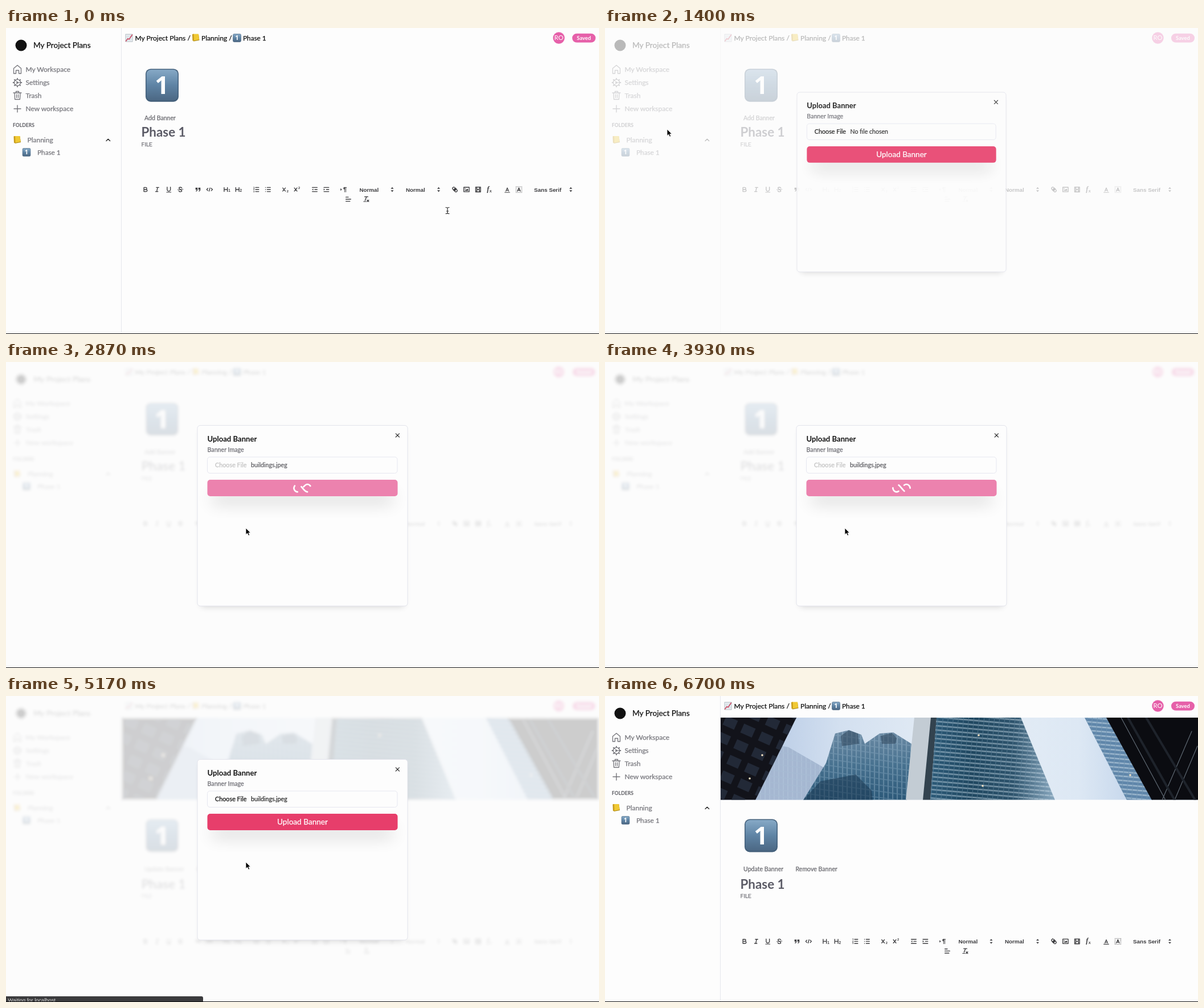
Recreate the animation shown at these times as an HTML page. Size 1041 by 538 pixels, loop 6.73 s.

```html
<!DOCTYPE html>
<html lang="en">
<head>
<meta charset="utf-8">
<title>Upload banner</title>
<style>
html, body { margin: 0; width: 100%; height: 100%; overflow: hidden; background: #fdfdfd; }
svg { display: block; width: 1041px; height: 538px; font-family: Lato, "Open Sans", sans-serif; }
.line { fill: none; stroke-linecap: round; stroke-linejoin: round; }
.ui { font-family: "Liberation Sans", Arial, sans-serif; }
</style>
</head>
<body>
<svg id="stage" viewBox="0 0 1041 538" xmlns="http://www.w3.org/2000/svg"></svg>
<script>
const LOOP = 6730;
const OPEN = 1295, CLOSE = 6225, FADE = 200;
const PICKED = 2080, SEND = 2600, DONE = 4860;
const STATUS = [5000, 5680], FOCUS = 6040;
const PINK = '#e73e6b', GRAY = '#75757b', INK = '#3c3c3f';

// Medium weight is regular with a thin outline
const text = (x, y, s, size, fill = '#111', weight = 400, extra = '') =>
  `<text x="${x}" y="${y}" font-size="${size}" fill="${fill}" ` +
  (weight === 500 ? `stroke="${fill}" stroke-width=".25" ` : `font-weight="${weight}" `) + `${extra}>${s}</text>`;
const rect = (x, y, w, h, fill, extra = '') =>
  `<rect x="${x}" y="${y}" width="${w}" height="${h}" fill="${fill}" ${extra}/>`;
const poly = (points, fill, extra = '') => `<polygon points="${points}" fill="${fill}" ${extra}/>`;
const line = (d, color, width, extra = '') =>
  `<path class="line" d="${d}" stroke="${color}" stroke-width="${width}" ${extra}/>`;
const group = (id, body, extra = '') => `<g id="${id}" ${extra}>${body}</g>`;
const at = (x, y, k, body) => `<g transform="translate(${x} ${y}) scale(${k})">${body}</g>`;

// Keycap tile, centred, 58 units wide
const keycap = (x, y, k) => at(x, y, k,
  rect(-29, -29, 58, 58, '#44607b', 'rx="9"') +
  rect(-27.5, -27.5, 55, 54, 'url(#cap)', 'rx="8"') +
  text(-.5, 15, '1', 43, '#fff', 700, 'text-anchor="middle" font-family="Open Sans, sans-serif"'));

const notebook = (x, y) => at(x, y, 1,
  poly('-5,-6 5,-6 6.5,4.5 -4,6.5', '#a98512') + poly('-5,-6.5 5,-6.5 6,3.5 -4,5.5', '#f0c934') +
  poly('-6,-6 -3.5,-6.5 -3,5.3 -5.5,5.5', '#c79a1a'));

const chart = (x, y) => at(x, y, 1,
  rect(-6, -6.5, 12, 13, '#e9eef2', 'stroke="#9aa5ad" stroke-width=".7"') +
  line('M-6,-2H6M-6,2H6M-2,-6V6M2,-6V6', '#c3cfd7', .5) +
  line('M-5.5,5.5L-2,1L0,2.5L5.5,-5.5', '#c9405a', 1.4));

// Editor toolbar glyphs on an 18 unit grid
const stroke = d => line(d, INK, 1.9);
const fill = d => `<path d="${d}" fill="${INK}"/>`;
const glyphText = (x, y, s, size, extra = '') => text(x, y, s, size, INK, 700, `class="ui" ${extra}`);
const rows = 'M7,4H15M7,9H15M7,14H15';
const letterA = stroke('M5.5,13L9,5L12.5,13M11.6,11H6.4');
const serif = 'font-style="italic" style="font-family:Liberation Serif,serif"';
const GLYPHS = {
  bold: stroke('M5,4H9.5A2.5,2.5 0 0 1 9.5,9H5ZM5,9H10.5A2.5,2.5 0 0 1 10.5,14H5Z'),
  italic: stroke('M7,4H13M5,14H11M8,14L10,4'),
  underline: stroke('M5,3V9A4,4 0 0 0 13,9V3') + fill('M3,15H15V16.4H3Z'),
  strike: stroke('M12.5,5.5C12,4 10.5,3.5 9,3.5C4.5,3.5 4.5,7.5 9,9C13.5,10.5 13.5,14.5 9,14.5C7,14.5 5.5,13.5 5.3,12') +
    line('M2.5,9.5L15.5,8.5', INK, 1.2),
  quote: fill('M3,4.5H8V9C8,12 6.5,14 4,14V12C5.4,12 6,11 6,9.5H3ZM10,4.5H15V9C15,12 13.5,14 11,14V12C12.4,12 13,11 13,9.5H10Z'),
  code: stroke('M5,6L2,9L5,12M13,6L16,9L13,12M10,5L8,13'),
  h1: stroke('M2,4V14M10,4V14M10,9H2') + glyphText(12, 15, '1', 9),
  h2: stroke('M2,4V14M10,4V14M10,9H2') + glyphText(12, 15, '2', 9),
  ordered: stroke(rows) + ['1', '2', '3'].map((n, i) => glyphText(1.5, 6 + i * 5, n, 6)).join(''),
  bullet: stroke(rows + 'M3,4H3.1M3,9H3.1M3,14H3.1'),
  sub: stroke('M2.5,5L9,13M9,5L2.5,13') + glyphText(12, 16, '2', 8),
  sup: stroke('M2.5,5L9,13M9,5L2.5,13') + glyphText(12, 7, '2', 8),
  outdent: stroke('M3,4H15M3,14H15M9,9H15') + fill('M5.5,6.5V11.5L2.5,9Z'),
  indent: stroke('M3,4H15M3,14H15M9,9H15') + fill('M2.5,6.5V11.5L5.5,9Z'),
  direction: fill('M1,6V12L4.5,9ZM11,3A3,3 0 0 0 11,9H12V3Z') + line('M15.5,4H11M11,4V15M14,4V15', INK, 1.3),
  link: stroke('M7,11L11,7M8.9,4.6A3.5,3.5 0 1 1 4.6,8.9C3.2,7.5 2,6.4 4.2,4.2S7.5,3.2 8.9,4.6ZM13.4,9.1A3.5,3.5 0 1 0 9.1,13.4C10.5,14.8 11.6,16 13.8,13.8S14.8,10.5 13.4,9.1Z'),
  image: stroke('M2.5,3.5H15.5V14.5H2.5Z') + fill('M5,12V11L7,9L8,10L11,7L13,9V12ZM5,6H7V8H5Z'),
  video: stroke('M3,3H15V15H3ZM6,3V15M12,3V15M6,9H12') + line('M3,6H6M3,12H6M12,6H15M12,12H15', INK, 1),
  formula: glyphText(2, 13, 'f', 17, serif) + glyphText(8, 16, 'x', 12, serif),
  color: line('M5.5,13L9,5L12.5,13M11.6,11H6.4M3,16H15', INK, 1.6),
  background: line('M2,2H16V16H2Z', INK, 1.4, 'stroke-dasharray=".1 2.7"') + letterA,
  align: stroke('M3,9H15M3,14H13M3,4H9'),
  clean: stroke('M5,3H13M6,12L9.2,4M11,11L15,15M15,11L11,15') + fill('M2,14H9V15.5H2Z'),
  updown: fill('M5.5,10.8H12.5L9,14.8ZM5.5,7.2H12.5L9,3.2Z')
};
const glyph = (name, x, y) => at(x - 6.5, y - 6.5, .72, GLYPHS[name]);
const run = (x, names, y = 284) => names.split(' ').map((n, i) => glyph(n, x + i * 20.4, y)).join('');
const label = (x, s) => text(x, 287.5, s, 9.8, INK, 700, 'class="ui"');

const toolbar = run(245, 'bold italic underline strike') + run(337, 'quote code') + run(388, 'h1 h2') +
  run(439.5, 'ordered bullet') + run(490.5, 'sub sup') + run(542, 'outdent indent') + run(593, 'direction') +
  label(620.5, 'Normal') + run(678, 'updown') + label(702, 'Normal') + run(759.5, 'updown') +
  run(788, 'link image video formula') + run(880, 'color background') +
  label(927, 'Sans Serif') + run(991.5, 'updown') + run(601, 'align', 301) + run(632.5, 'clean', 301);

const gear = () => {
  let d = '';
  for (let i = 0; i < 8; i++) {
    const a = i * Math.PI / 4, c = Math.cos(a), s = Math.sin(a);
    d += `M${20 + 5.6 * c},${96 + 5.6 * s}L${20 + 7.4 * c},${96 + 7.4 * s}`;
  }
  return line(d, GRAY, 1.8) + line('M20,96L16.5,91M20,96H26M20,96L16.5,101', GRAY, 1) +
    `<circle cx="20" cy="96" r="5.6" fill="none" stroke="${GRAY}" stroke-width="1.3"/><circle cx="20" cy="96" r="1.8" fill="${GRAY}"/>`;
};

const sidebar = '<circle cx="26.5" cy="30.5" r="10" fill="#111"/>' +
  text(48, 35.2, 'My Project Plans', 13.7, '#111', 500) +
  line('M13.5,71L20,65.5L26.5,71V80H22.5V74.5H17.5V80H13.5Z', GRAY, 1.3) + gear() +
  line('M13,114H27M15,114L15.6,125.5H24.4L25,114M17.5,113.5V111.5H22.5V113.5M18.5,117V122.5M21.5,117V122.5', GRAY, 1.3) +
  line('M14,142H26M20,136V148', GRAY, 1.4) +
  ['My Workspace', 'Settings', 'Trash', 'New workspace'].map((s, i) => text(34.5, 76.8 + i * 23.1, s, 12, GRAY, 500)).join('') +
  text(12, 173.7, 'FOLDERS', 8.6, '#5c5c62', 700) + notebook(19.5, 196.5) + text(37.5, 201, 'Planning', 12, GRAY, 500) +
  line('M176,198.5L179.3,195.3L182.6,198.5', '#222', 1.3) +
  keycap(36, 218.5, .25) + text(55, 222.6, 'Phase 1', 11.8, GRAY, 500) + rect(202, 0, 1, 538, '#e6e7ec');

const header = chart(216, 17.5) + text(226.5, 21.6, 'My Project Plans /', 12.1, '#111', 500) +
  notebook(333, 17) + text(343, 21.6, 'Planning /', 12, '#111', 500) +
  keycap(405.5, 17.5, .25) + text(416, 21.6, 'Phase 1', 11.8, '#111', 500) +
  '<circle cx="970.5" cy="17.5" r="10.2" fill="#e660a9"/>' +
  text(970.5, 21.4, 'RO', 11.3, '#fff', 400, 'text-anchor="middle"') +
  rect(994, 9.8, 41, 15.8, '#e660a9', 'rx="7.9"') + text(1014.5, 21, 'Saved', 9.4, '#fff', 700, 'text-anchor="middle"');

// Skyline reduced to flat shapes and soft gradients
const shape = (points, base, detail, strength) =>
  poly(points, base) + poly(points, detail, `opacity="${strength}"`);
const skyline = rect(203, 38, 838, 145, 'url(#sky)') +
  shape('300,86 322,90 388,128 352,183 262,183', '#a5b7d1', 'url(#panes)', .25) +
  shape('203,38 336,38 264,183 203,183', '#12131a', 'url(#dark)', 1) +
  shape('348,183 388,118 404,66 428,60 450,68 456,84 482,66 506,64 538,84 530,183', 'url(#steel)', 'url(#panes)', .3) +
  poly('348,183 378,150 440,138 468,166 470,183', '#1d3a52', 'opacity=".55"') +
  poly('414,70 428,60 444,66 446,84 416,88', '#263f55', 'opacity=".5"') +
  poly('484,70 504,65 512,74 510,84 486,84', '#263f55', 'opacity=".5"') +
  poly('543,38 592,38 574,183 528,183', '#c3ccd4') + poly('572,38 582,38 571,183 558,183', '#33434f') +
  shape('582,38 730,38 790,183 571,183', 'url(#glass)', 'url(#floors)', .45) +
  shape('842,38 884,38 962,183 916,183', '#5f86aa', 'url(#floors)', .5) +
  poly('880,38 1041,38 1041,183 960,183', '#0b0c11') +
  line('M906,38L984,183M1030,62L978,183M1040,88L1000,183', '#5f6973', 1.2) +
  line('M918,38L1000,183M950,38L1036,183', '#1e232b', 4) +
  [[276, 104], [254, 145], [663, 158], [656, 69], [922, 139]].map(([x, y]) => `<circle cx="${x}" cy="${y}" r="1.8" fill="#f7e4c5"/>`).join('');

const main = group('banner', skyline, 'clip-path="url(#bannerBox)"') +
  group('tile', keycap(274, 100.7, 1)) +
  group('links', '<text id="addLink" x="243" y="161.8" font-size="10.6" fill="#68686e" stroke="#68686e" stroke-width=".25"/>' +
    group('removeLink', text(334.5, 161.8, 'Remove Banner', 10.6, '#68686e', 500))) +
  group('editor', text(237.5, 191.3, 'Phase 1', 22.4, '#5b5b66', 700) + text(237.5, 208, 'FILE', 10, GRAY, 500) + toolbar);

const infinity = 'M24.3,30C11.4,30 5,43.3 5,50S11.4,70 24.3,70C43.6,70 56.4,30 75.7,30C88.6,30 95,43.3 95,50S88.6,70 75.7,70C56.4,70 43.6,30 24.3,30Z';
const dialog = rect(342, 120, 357, 310, '#000', 'rx="5" opacity=".17" filter="url(#soft)"') +
  rect(336, 111.5, 369, 317.5, '#fdfdfd', 'rx="5" stroke="#e3e4ec"') +
  rect(362, 234, 317, 12, '#000', 'opacity=".22" filter="url(#wide)"') +
  text(353.5, 140, 'Upload Banner', 13.1, '#111', 700) +
  text(353.5, 157.5, 'Banner Image', 10.7, '#6b6b72', 500) +
  rect(353.5, 167, 333.5, 28.5, '#fdfdfd', 'rx="4.5" stroke="#e6e7f0"') +
  group('choose', text(367, 185, 'Choose File', 10.8, '#111', 500)) +
  '<text id="file" x="430" y="185" font-size="10.65" stroke-width=".2"/>' +
  '<rect id="button" x="353.5" y="207" width="334" height="29" rx="5"/>' +
  group('caption', text(520.5, 226.2, 'Upload Banner', 13.6, '#fff', 500, 'text-anchor="middle"')) +
  group('spinner', `<path id="dash" class="line" d="${infinity}" stroke="#fff" stroke-width="8" stroke-dasharray="42.765"/>`,
    'transform="translate(520.5 221.7) scale(.336) translate(-50 -50)"') +
  group('ring', rect(679.5, 121.5, 15.5, 15.5, 'none', `rx="4" stroke="${PINK}" stroke-width="1.6"`)) +
  line('M684.2,125.8L690.4,132M690.4,125.8L684.2,132', '#333', 1.2);

const cursors = group('arrow', '<path d="M0,0V11.5L2.7,9L4.6,13.2L6.6,12.3L4.8,8.3H8.3Z" fill="#000" stroke="#fff" stroke-width=".8"/>') +
  group('hand', '<path d="M-1.3,1Q0,-1 1.3,1V5L5,5.8Q6.3,6.2 6.2,7.6L5.4,11.5H-1L-4,7.8Q-4.6,6.4 -3,6.4L-1.3,7.6Z" fill="#fff" stroke="#000" stroke-width="1"/>') +
  group('beam', line('M-3,-5.5Q0,-5.5 0,-4V4Q0,5.5 -3,5.5M3,-5.5Q0,-5.5 0,-4M0,4Q0,5.5 3,5.5M-1.5,1H1.5', '#222', 1.1));

const pattern = (id, w, h, turn, body) =>
  `<pattern id="${id}" width="${w}" height="${h}" patternUnits="userSpaceOnUse" patternTransform="${turn}">${body}</pattern>`;
const gradient = (id, vertical, ...colors) =>
  `<linearGradient id="${id}" x2="${vertical ? 0 : 1}" y2="${vertical ? 1 : 0}">` +
  colors.map((c, i) => `<stop offset="${i / (colors.length - 1)}" stop-color="${c}"/>`).join('') + '</linearGradient>';
const blur = (id, sigma, area) =>
  `<filter id="${id}" ${area}><feGaussianBlur stdDeviation="${sigma}"/></filter>`;
const roomy = 'x="-50%" y="-500%" width="200%" height="1100%"';

const stage = document.getElementById('stage');
stage.innerHTML = '<defs>' +
  gradient('cap', true, '#86a9c6', '#5f84a5', '#4c6884') +
  gradient('sky', false, '#a9bfdf', '#d3e0f0', '#e6eef6', '#dde8f4', '#a9c2e2') +
  gradient('steel', true, '#6d8ba5', '#47718f', '#2b5878') +
  gradient('glass', false, '#2c5a78', '#1f4760', '#2d536c', '#8aa9c0') +
  pattern('panes', 8, 11, 'skewY(8)', rect(0, 0, 2, 11, '#c3d8e6') + rect(0, 0, 8, 1.5, '#a9c6da')) +
  pattern('floors', 9, 7.5, 'rotate(5)', rect(0, 0, 9, 2.6, '#d2e2ec') + rect(0, 0, 1, 7.5, '#7fa0b6')) +
  pattern('dark', 34, 30, 'rotate(24)', rect(5, 5, 22, 17, '#222937')) +
  '<clipPath id="bannerBox"><rect x="203" y="38" width="838" height="144.5"/></clipPath>' +
  blur('veil', 2.4, 'filterUnits="userSpaceOnUse" x="0" y="0" width="1041" height="538"') +
  blur('soft', 6, 'x="-20%" y="-20%" width="140%" height="140%"') + blur('wide', 15, roomy) + '</defs>' +
  group('page', rect(-20, -20, 1081, 578, '#fdfdfd') + sidebar + header + main) +
  group('overlay', '<use id="backdrop" href="#page"/>' + rect(0, 0, 1041, 538, '#fdfdfd', 'opacity=".8"')) +
  group('dialog', dialog) +
  group('status', '<path d="M0,528H343Q346,528 346,531V538H0Z" fill="#3b3b3d"/>' +
    text(3.5, 537.8, 'Waiting for localhost', 9.3, '#d8d8d8', 400, 'class="ui"')) +
  rect(0, 537, 1041, 1, '#111') + group('cursor', cursors);

const el = {};
stage.querySelectorAll('[id]').forEach(node => el[node.id] = node);
const show = (name, on) => el[name].style.display = on ? '' : 'none';
const move = (name, y) => el[name].setAttribute('transform', `translate(0 ${y})`);
const set = (name, key, value) => el[name].setAttribute(key, value);

const clamp = v => Math.max(0, Math.min(1, v));
const easeOut = v => 1 - (1 - v) ** 3;
const smooth = v => v * v * (3 - 2 * v);

// time, x, y, pointer shape from then on
const PATH = [
  [0, 775, 321, 'beam'], [120, 775, 321, 'beam'], [740, 270, 158, 'hand'], [1020, 270, 158, 'arrow'],
  [1340, 109, 178, 'arrow'], [1440, 109, 178, 'arrow'], [1720, 395, 182, 'arrow'], [2120, 395, 182, 'arrow'],
  [2440, 470, 222, 'hand'], [2620, 470, 222, 'arrow'], [2800, 421, 292, 'arrow'], [5500, 421, 292, 'arrow'],
  [5940, 687, 133, 'hand'], [6420, 687, 133, 'none']
];

function drawCursor(t) {
  let i = PATH.length - 1;
  while (PATH[i][0] > t) i--;
  const [t0, x0, y0, shape] = PATH[i];
  const [t1, x1, y1] = PATH[i + 1] || [LOOP, x0, y0];
  const k = smooth((t - t0) / (t1 - t0));
  set('cursor', 'transform', `translate(${x0 + (x1 - x0) * k} ${y0 + (y1 - y0) * k})`);
  for (const name of ['arrow', 'hand', 'beam']) show(name, name === shape);
}

function draw(t) {
  const hasBanner = t >= DONE, loading = t >= SEND && t < DONE, picked = t >= PICKED;
  show('banner', hasBanner);
  show('removeLink', hasBanner);
  move('tile', hasBanner ? 144.8 : 0);
  move('links', hasBanner ? 146 : 0);
  move('editor', hasBanner ? 147.4 : 0);
  el.addLink.textContent = hasBanner ? 'Update Banner' : 'Add Banner';

  // The backdrop blurs only while the dialog is fully open
  const p = easeOut(clamp((t - OPEN) / FADE)) * (1 - easeOut(clamp((t - CLOSE) / FADE)));
  show('overlay', p > 0);
  show('dialog', p > 0);
  set('backdrop', 'filter', p === 1 ? 'url(#veil)' : 'none');
  set('overlay', 'opacity', p);
  set('dialog', 'opacity', p);
  set('dialog', 'transform', `translate(520.5 ${270 + 6.4 * (1 - p)}) scale(${.95 + .05 * p}) translate(-520.5 -270)`);

  const fileInk = loading ? '#55555a' : '#222';
  el.file.textContent = picked ? 'buildings.jpeg' : 'No file chosen';
  set('file', 'fill', fileInk);
  set('file', 'stroke', fileInk);
  set('choose', 'opacity', loading ? .25 : 1);
  set('button', 'fill', loading ? '#ec82ae' : PINK);
  show('caption', !loading);
  show('spinner', loading);
  set('dash', 'stroke-dashoffset', 56 + 256.589 * (t - 3930) / 1111);
  show('ring', t >= FOCUS);
  show('status', t >= STATUS[0] && t < STATUS[1]);
  drawCursor(t);
}

function tick() {
  draw(performance.now() % LOOP);
  requestAnimationFrame(tick);
}
tick();
</script>
</body>
</html>
```
